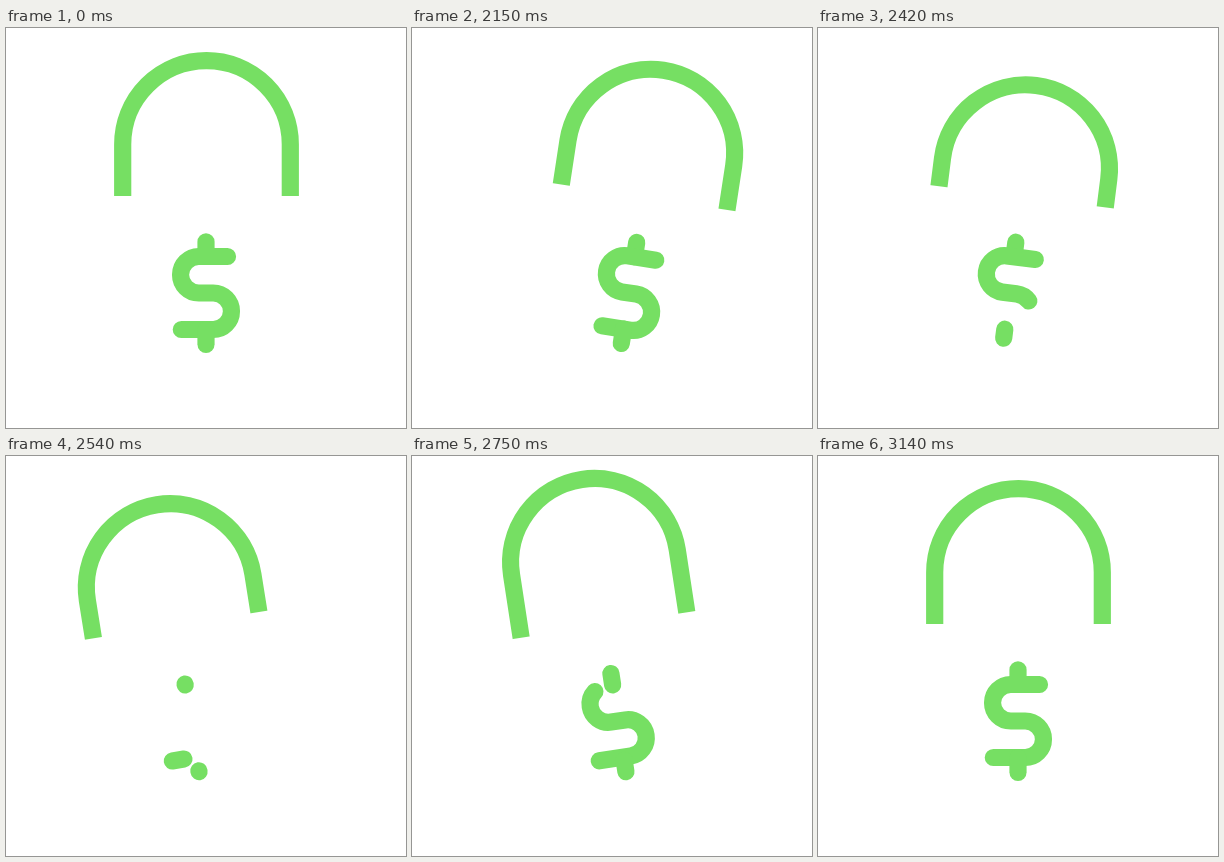
Animation, 400 px wide and 400 px high, one loop 3170 ms. Source, as an HTML page:

```html
<!DOCTYPE html>
<html lang="en">
<head>
<meta charset="utf-8">
<title>Padlock</title>
<style>
  html, body { margin: 0; height: 100%; overflow: hidden; background: #fff; }
  svg { display: block; width: 100vw; height: 100vh; }

  .lock, .shackle, .sign path { animation: 3170ms linear infinite; }
  .line { fill: none; stroke: #76df63; stroke-width: 17.2; }

  .lock {
    transform-box: view-box;
    transform-origin: 200px 265px;
    animation-name: sway, tilt;
  }
  .shackle { animation-name: drop; }
  .sign { stroke-linecap: round; stroke-linejoin: round; }
  .sign path { stroke-dasharray: 1 1; animation-name: trace; }

  @keyframes sway {
    0%, 64.03% { translate: 0 0; }
    64.04% { translate: 3.5px 0; }
    70.4% { translate: 26px 0; }
    72.56% { translate: 14.8px 0; }
    76.34% { translate: -8.4px 0; animation-timing-function: ease-out; }
    78.6% { translate: -17px 0; animation-timing-function: ease-in; }
    83.91% { translate: -1.3px 0; animation-timing-function: ease-out; }
    87.8% { translate: 7px 0; }
    91.48% { translate: 4.3px 0; }
    99.05%, 100% { translate: 0 0; }
  }

  @keyframes tilt {
    0%, 64.03% { rotate: 0deg; }
    64.04% { rotate: .7deg; animation-timing-function: ease-in-out; }
    71.6% { rotate: 16.4deg; animation-timing-function: ease-in; }
    76.34% { rotate: 7.4deg; animation-timing-function: ease-out; }
    83.3% { rotate: -15deg; animation-timing-function: ease-in-out; }
    92.1% { rotate: 4.4deg; animation-timing-function: ease-in-out; }
    99.05%, 100% { rotate: 0deg; }
  }

  @keyframes drop {
    0%, 64.04% { translate: 0 0; animation-timing-function: ease-in-out; }
    74.4% { translate: 0 25px; animation-timing-function: ease-in; }
    83.91% { translate: 0 -1.3px; animation-timing-function: ease-out; }
    87.1% { translate: 0 -12px; animation-timing-function: ease-in-out; }
    91.48% { translate: 0 2.6px; animation-timing-function: ease-in-out; }
    99.05%, 100% { translate: 0 0; }
  }

  /* Wipes each stroke from its end, then redraws it the same way. */
  @keyframes trace {
    0%, 64.67% { stroke-dashoffset: 0; animation-timing-function: cubic-bezier(.65, 0, .2, 1); }
    98.9%, 100% { stroke-dashoffset: 2; }
  }
</style>
</head>
<body>
<svg viewBox="0 0 400 400">
  <g class="lock">
    <path class="shackle line" d="M116.7 210V116.3A83.8 83.8 0 0 1 284.3 116.3V210"/>
    <rect x="75" y="168" width="250" height="185" rx="12" fill="#fff"/>
    <g class="sign line">
      <path pathLength="1" d="M200 213.8V228.5"/>
      <path pathLength="1" d="M221.5 228.5H192.8A18.25 18.25 0 0 0 192.8 265H207.2A18.25 18.25 0 0 1 207.2 301.5H175.3"/>
      <path pathLength="1" d="M200 301.5V316.3"/>
    </g>
  </g>
</svg>
</body>
</html>
```
